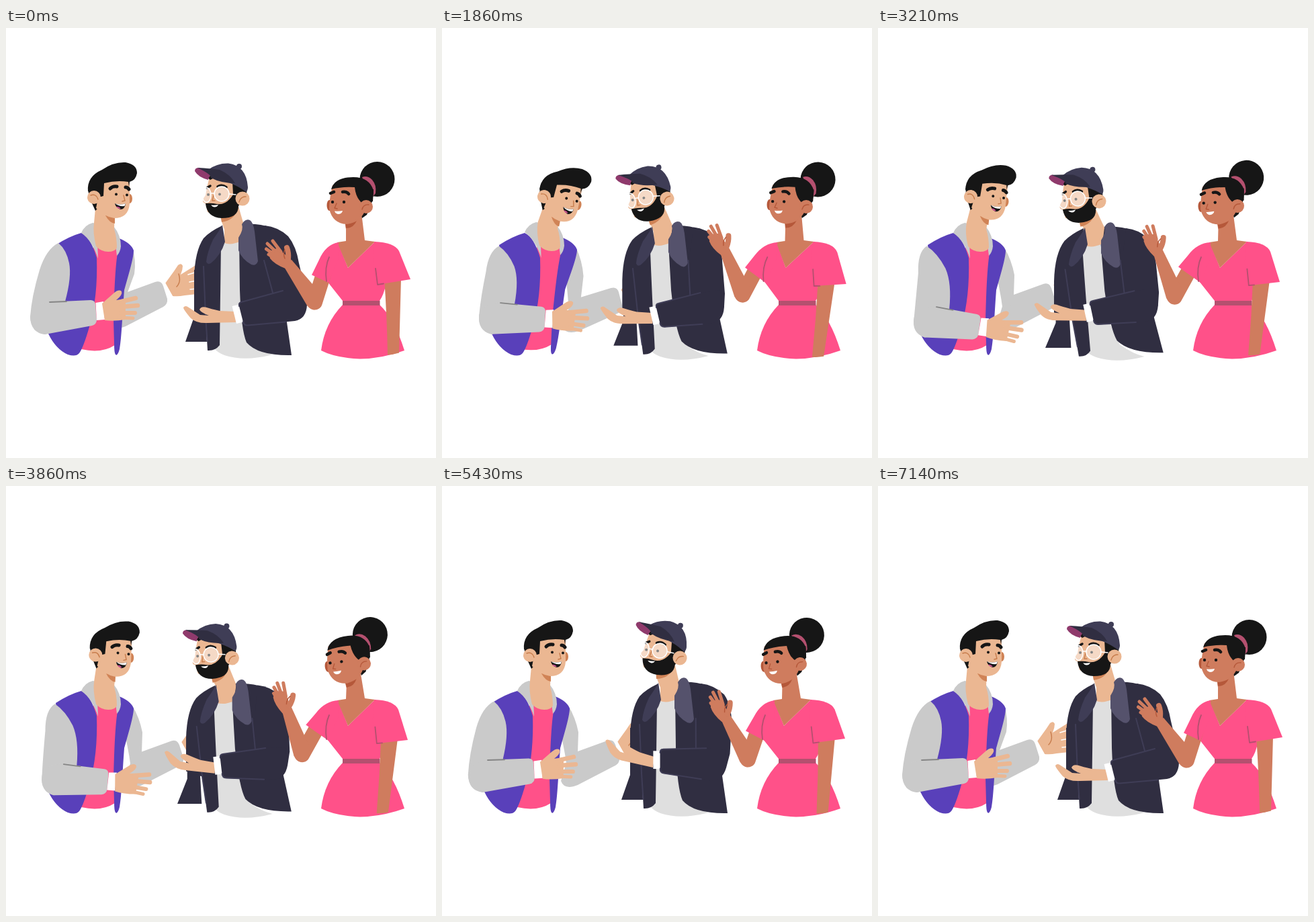
Animation, 640 px wide and 640 px high, one loop 7.21 s. Source, as an HTML page:

```html
<!DOCTYPE html>
<html lang="en">
<head>
<meta charset="utf-8">
<title>Three people talking</title>
<style>
html,body{margin:0;width:100%;height:100%;overflow:hidden;background:#fff}
svg{display:block;width:100%;height:100%}
.line{fill:none;stroke-linecap:round;stroke-linejoin:round}
.purple{fill:#5940ba}.pink{fill:#ff5189}.grey{fill:#cacaca}.pale{fill:#dfdfdf}
.skin{fill:#ebb792}.tan{fill:#cf7c5e}.navy{fill:#302e41}.slate{fill:#3f3d56}
.hair{fill:#161616}.white{fill:#fff}.rose{fill:#b4506f}.shade{fill:#d08356}.rust{fill:#b5583a}
.sSkin{stroke:#ebb792}.sTan{stroke:#cf7c5e}.sHair{stroke:#161616}
.sSlate{stroke:#3f3d56;stroke-width:2}.sShade{stroke:#c77c4c;stroke-width:1.4}
.sRust{stroke:#b5583a;stroke-width:1.4}.sRose{stroke:#b4506f;stroke-width:1.8}
</style>
</head>
<body>
<svg viewBox="0 0 640 640">
<!-- left man -->
<g id="leftFar">
  <path class="skin" d="M237 380L250 362L256 353Q261 349 263 354Q263 360 260 367L284 352L284 396L266 398Q255 400 248 399Z"/>
  <path class="line sShade" d="M254 385Q261 378 257 366"/>
  <path class="line" stroke="#fff" stroke-width="1.5" d="M271 367L284 363M273 378L284 376M274 389L284 388"/>
  <path class="white" d="M232 383L237 379L248 399L238 405Z"/>
  <path class="grey" d="M178 394L222 378Q231 375 234 384L240 403Q241 411 234 415L178 444Q158 452 153 438L165 398Z"/>
</g>
<path id="leftFarUpper" class="grey" d="M170 330L188 327Q194 345 191 366L180 396L165 440L160 400Z"/>
<path id="leftShirt" class="pink" d="M130 326L167 326Q164 380 162 472Q142 485 112 478Q128 440 130 326Z"/>
<path id="leftPanel" class="purple" d="M74 323Q94 310 112 305Q126 311 135 342Q137 400 124 445Q115 476 109 484Q104 490 92 486Q74 478 63 455L84 400Z"/>
<g id="leftTop">
  <path class="purple" d="M168 313Q186 320 190 331Q190 340 183 365L176 390C173 430 172 462 169 478Q166 489 163 486Q161 484 161 470L160 435C161 400 162 360 166 335Z"/>
  <path class="grey" d="M112 305Q117 293 129 290L135 291L137 343Q128 316 112 305Z"/>
  <path class="grey" d="M160 295Q171 308 171 325Q170 334 165 339L162 315Z"/>
</g>
<path id="leftNeck" class="skin" d="M134 258L131 290Q129 305 134 325Q142 333 152 333Q162 333 165 327Q165 312 161 299L162 270Z"/>
<g id="leftHead">
  <path class="shade" d="M148 279Q154 290 162 291L162 280Z"/>
  <ellipse class="shade" cx="184" cy="254" rx="4" ry="7"/>
  <path class="hair" d="M122 240L124 252L133 272L150 255L150 230Z"/>
  <path class="skin" d="M142 228L184 226L184 262Q182 283 161 283Q146 281 134 268Z"/>
  <path class="hair" d="M122 243Q120 221 143 211Q160 199 178 200Q195 203 195 216Q193 227 184 229L183 236L182 229Q165 226 146 231L145 250L138 252Z"/>
  <circle class="skin" cx="131" cy="252" r="10"/>
  <path class="line sShade" d="M126 249Q134 246 137 255"/>
  <path class="line sHair" stroke-width="5" d="M155 239Q159 235 165 236M178 237Q181 237 183 240"/>
  <circle class="hair" cx="164" cy="247.500" r="2"/><circle class="hair" cx="180" cy="248.500" r="2"/>
  <path class="line sShade" d="M175 249L177 257L173 258"/>
  <path class="hair" d="M162 261Q170 264 178 261Q177 270 170 270Q163 267 162 261Z"/>
  <path class="white" d="M162 261Q170 264 178 261L176.500 265Q168 266 162 261Z"/>
  <path fill="#c8508f" d="M164 266Q168 265 171 269Q167 270 164 266Z"/>
</g>
<path id="leftUpper" class="grey" d="M78 320Q60 329 50 360Q38 400 36 430Q37 452 58 456L100 440L88 407Q98 370 94 350Q90 330 78 320Z"/>
<g id="leftNear">
  <path class="grey" d="M36 430Q37 454 58 456L128 443Q135 441 135 434L133 411Q132 405 126 405L60 408Q38 415 36 430Z"/>
  <path class="line" stroke="#858585" stroke-width="1.800" d="M65 408L90 407"/>
  <path class="white" d="M133.500 409L145 407L147 434L135 435Z"/>
  <path class="skin" d="M143 410L160 395Q168 388 172 392Q174 397 164 405L178 403L178 434Q160 437 147 435Z"/>
  <g class="line sSkin"><path stroke-width="6.500" d="M172 407L193 402M172 415L196 413"/><path stroke-width="6" d="M172 424L192 424"/><path stroke-width="5" d="M168 431L189 432"/></g>
</g>
<!-- middle man -->
<path id="midShirt" class="pale" d="M318 312L350 312L352 440L362 468Q380 482 397 486Q355 497 325 487Q315 483 310 477L317 465Z"/>
<path id="midFlap" class="navy" d="M280 360L280 430L267 467L299 467L297 425L300 360Z"/>
<path id="midLeft" class="navy" d="M322 294Q303 303 294 313Q281 332 280 372L280 420L297 428L300 480Q311 481 318 472Q319 400 320 320Z"/>
<path id="midSeam" class="line sSlate" d="M294 355L297 428L299.500 466"/>
<path id="midRight" class="navy" d="M345 293Q372 289 395 297Q418 306 423 345L417 431L425 487Q375 488 358 468Q350 450 348 390L347 310Z"/>
<path id="midNeck" class="skin" d="M318 275L321 288L325 300L325 320Q335 324 350 317L354 293L345 262Z"/>
<g id="midTop">
  <path class="slate" d="M322 293Q318 301 308 315Q299 335 298 348Q300 353 305 350Q320 338 326 318Z"/>
  <path fill="#55526c" d="M354 288Q358 284 363 286Q368 289 370 303L375 347Q372 355 365 352Q351 344 346 331L346 312Q354 300 351 292Z"/>
</g>
<g id="midHead">
  <path class="shade" d="M320 283Q335 282 344 270Q340 286 321 289Z"/>
  <path class="skin" d="M304 218Q299 236 297 249Q289 259 297 261L300 274L322 280L345 262L348 230Z"/>
  <path class="hair" d="M337 228L359 238L358 246L346 265Q346 283 321 283Q299 282 297 261Q306 260 314 262Q328 264 338 248ZM300 223L306 218L312 222L304 226Z"/>
  <circle class="skin" cx="352" cy="254" r="10.500"/>
  <path class="line sShade" d="M347 259Q349 251 357 251"/>
  <path class="slate" d="M301 211Q314 201 331 201.500Q358 205 360 237Q360 242 357 244Q340 230 306 223Z"/>
  <circle class="slate" cx="347" cy="206" r="4"/>
  <path fill="#8f3a6c" d="M287 208Q281 208 281 213Q286 222 301 226Q302 220 308 217Z"/>
  <path class="navy" d="M285 208Q304 209 318 211Q334 218 341 231Q320 231 305 223Q306 218 285 208Z"/>
  <path class="line sHair" stroke-width="3.500" d="M315 236Q321 232 328 237M299 238L304 235"/>
  <circle class="hair" cx="301" cy="248" r="2"/><circle class="hair" cx="318" cy="247.500" r="2"/>
  <path class="line sShade" d="M309 249L307 257L311 257"/>
  <g stroke="#fff" stroke-width="1.500" fill="#fff" fill-opacity=".48"><circle cx="321" cy="247" r="11"/><ellipse cx="298.500" cy="248.500" rx="6.500" ry="11"/><path class="line" d="M305 246L310 246M332 247L342 248"/></g>
  <path class="white" d="M305 263.500Q311 264 316 263Q314 267 310 266.500Q307 266 305 263.500Z"/>
</g>
<path id="midUpper" class="navy" d="M385 294Q405 296 420 310Q432 325 436 350L446 392L448 412L400 420L385 349Z"/>
<path id="midFold" class="line sSlate" d="M384 349L397 394"/>
<g id="midFore">
  <path class="skin" d="M341 422L318 421Q305 418 297 415.500Q290 414 288 419Q289 423 302 428L289 427L272 416Q267 412 264 416Q264 419 275 432Q284 440 300 439L342 438Z"/>
  <path class="white" d="M336.500 414L349 411L356 437L343 440Z"/>
  <path class="navy" d="M347 414Q346 409 350 408L412 391L441 386L448 412Q447 433 430 436L360 443Q354 443 353 438Z"/>
  <path class="line sSlate" d="M347 414Q346 409 350 408L412 391M353 437Q354 443 360 442.500L416 437.500"/>
</g>
<!-- woman -->
<path class="pink" d="M501 412L556 412Q578 432 593 480Q560 492 527 492.500Q490 491 469 480Q474 440 501 412Z"/>
<path id="wBody" class="pink" d="M494 319L480 335L478 377L501 406L556 406Q562 398 566 380L570 330L549 318L509 357Z"/>
<path class="rose" d="M501 406H556.500V413H501Z"/>
<g id="wBun">
  <circle class="hair" cx="552.500" cy="225" r="26"/>
  <path class="rose" d="M530 222Q538 219 545 226Q552 234 550 246L543 255Z"/>
</g>
<path id="wNeck" class="tan" d="M504 284L506 300L506 317L493 319L509 357L549 318L534 316L529 275Z"/>
<g id="wHead">
  <path class="rust" d="M505 291Q516 290 522 287Q517 298 506 298Z"/>
  <ellipse class="rust" cx="481.500" cy="264" rx="4" ry="8"/>
  <path class="hair" d="M520 240L547 240Q547 254 543 264L537 278L530 283Z"/>
  <path class="tan" d="M486 234Q481 255 481 269Q486 291 507 292Q526 290 534 273L535 250L518 232Z"/>
  <path class="hair" d="M484 240Q489 222 517 222Q541 222 547 242L546 258L532 262Q521 255 519 237Q500 236 484 240Z"/>
  <circle class="tan" cx="536" cy="266" r="10"/>
  <path class="line sRust" d="M530 270Q532 262 540 263"/>
  <path class="line sHair" stroke-width="4.500" d="M483 246L488 244M501 244Q507 243 510 247"/>
  <circle class="hair" cx="486" cy="259" r="2.200"/><circle class="hair" cx="503" cy="259" r="2.200"/>
  <path class="line sRust" d="M492 261L489 268L493 269"/>
  <path class="white" d="M489 272.500Q495 273 501 272Q500 277 494 277Q490 276 489 272.500Z"/>
</g>
<path id="wUpper" class="line sTan" stroke-width="23"/>
<path id="wSleeveL" class="pink" d="M495 319Q476 322 466 345L455 367.500L480 379L494 345Z"/>
<path id="wCrease" class="line sRose" d="M481 341Q474 356 477 377"/>
<g id="wFore">
  <path class="tan" d="M448 413Q459 426 470 412L468 395L425 345L413 354Z"/>
  <g id="wHand">
    <path class="tan" d="M391 333L405 327L414 336L424 344L425 348L416 358Q400 352 393 343Z"/>
    <path class="line sTan" stroke-width="5" d="M409 333L397 317M405 336L389 321M402 339L387.500 329M402 344L391 337"/>
    <path class="line sTan" stroke-width="8" d="M418 327Q421 335 420 344"/>
    <path class="line sRust" d="M415 330Q412 336 415 343"/>
  </g>
</g>
<path id="wArm" class="tan" d="M563 372L588 372L585 483.500Q577 486 568 486.500Q567 430 563 372Z"/>
<path id="wSleeveR" class="pink" d="M548 318Q578 319 585 332L602 374L553 382L546 350Z"/>
<path id="wHem" class="line sRose" d="M550 358L553 382L562 380.500"/>
</svg>
<script>
const STEP = 7210 / 101;
const KEYS = [0, 12, 26, 45, 63, 76, 88, 100];
const REST = [0, 0, 0];

// One row per key: x, y, turn (or fewer values)
const TRACKS = {
  leftLean: [[0], [0], [1], [0], [0], [0], [0], [0]],
  leftHead: [REST, [9, -3, 14], [21, -1, 12], [7, -1, 6.5], REST, REST, REST, REST],
  leftNear: [REST, [1.5, 0, .5], [22, 1, 8], [22, 7, 13], [18, 4, 4.5], [3, 0, .5], REST, REST],
  leftFar: [REST, [24, 1, 0], [28, 10, 3], [24, 3, 0], [24, 1, 0], [24, 1, 0], [24, 1, 0], REST],
  midLean: [[0], [0], [.65], [1], [.22], [0], [0], [0]],
  midHead: [REST, REST, [-17, 0, -9], [-23, 4, -5.5], [-5, 0, -1], [2, 2, 7], [1, 0, 2], REST],
  midFore: [REST, [-20, -17, 14], [-28, 2, 1], [-31, -2, 2], [-23, -16, 13], [-21, -17, 14], [-20, -17, 14], REST],
  wLean: [[0], [6], [4.5], [0], [0], [0], [0], [0]],
  wHead: [REST, [10, 0, 2.5], [6, 0, 1], [-1, -1, -3], [-4, -2, -9.5], [-3, -1, -6], [-1, -.5, -2.5], REST],
  wFore: [REST, [0, -5, 5.5], [-12, -11, 12.7], [-18, -8, 14.5], [-19, -9, 17], [-4, -1, 6.6], [-1, 0, 2], REST],
  wHand: [[0], [6.5], [4], [8], [12], [13], [5], [0]],
  wSleeveL: [[0, 0], [4, -5], [-4, -11], [-8, -12], [-9, -12], [-3, -3], [-1, -1], [0, 0]],
  wSleeveR: [[0, 0], [0, 8], [-2, 7], [-4, 4], [-4, 4], [-2, 2], [-1, 1], [0, 0]],
  wArm: [REST, [0, 5, 6.4], [-4, 5, 6.9], [-5.5, 2, 6], [-5, 2, 5.5], [-3.5, 2, 3.7], [-1, 1, 1.5], REST]
};

const $ = id => document.getElementById(id);
const clamp = v => Math.max(0, Math.min(1, v));
const mix = (a, b, w) => a + (b - a) * w;

function slope(rows, i, c) {
  if (!i || i === KEYS.length - 1) return 0;
  const a = (rows[i][c] - rows[i - 1][c]) / (KEYS[i] - KEYS[i - 1]);
  const b = (rows[i + 1][c] - rows[i][c]) / (KEYS[i + 1] - KEYS[i]);
  return a * b > 0 ? 2 * a * b / (a + b) : 0;
}

// Monotone cubic through the keys
function sample(rows, f) {
  let i = 0;
  while (i < KEYS.length - 2 && f >= KEYS[i + 1]) i++;
  const h = KEYS[i + 1] - KEYS[i], u = (f - KEYS[i]) / h, v = 1 - u;
  return rows[i].map((p, c) =>
    p * v * v * (1 + 2 * u) + rows[i + 1][c] * u * u * (3 - 2 * u) +
    h * u * v * (slope(rows, i, c) * v - slope(rows, i + 1, c) * u));
}

const rigid = ([dx, dy, r], cx, cy) => {
  const a = r * Math.PI / 180, c = Math.cos(a), s = Math.sin(a);
  return (x, y) => [cx + dx + (x - cx) * c - (y - cy) * s, cy + dy + (x - cx) * s + (y - cy) * c];
};
const blend = (f, g, weight) => (x, y) => {
  const a = f(x, y), b = g(x, y), w = clamp(weight(x, y));
  return [mix(a[0], b[0], w), mix(a[1], b[1], w)];
};

const shapes = {};
function bend(id, fn) {
  const d = shapes[id] ??= $(id).getAttribute('d');
  $(id).setAttribute('d', d.replace(/([\d.]+) ([\d.]+)/g,
    (_, x, y) => fn(+x, +y).map(n => n.toFixed(2)).join(' ')));
}
const place = (id, [dx, dy, r], cx, cy) =>
  $(id).setAttribute('transform', `translate(${dx} ${dy}) rotate(${r} ${cx} ${cy})`);

function drawLeft(p) {
  const lean = p.leftLean[0] * 11;
  const body = (x, y) => [x + lean * clamp((488 - y) / 150), y - lean * .1];
  const shoulder = (x, y) => [x + lean * 1.1 - p.leftNear[0] * .25, y + p.leftNear[0] * .2];
  place('leftHead', p.leftHead, 131, 252);
  place('leftNear', p.leftNear, 64, 408);
  place('leftFar', p.leftFar, 240, 405);
  bend('leftPanel', (x, y) => [x + lean, y]);
  bend('leftShirt', body);
  for (const el of $('leftTop').children) {
    el.id ||= 'leftTop' + el.getAttribute('d').length;
    bend(el.id, body);
  }
  bend('leftNeck', blend(body, rigid(p.leftHead, 131, 252), (x, y) => (302 - y) / 35));
  bend('leftUpper', blend(shoulder, rigid(p.leftNear, 64, 408), (x, y) => (y - 320) / 100));
  bend('leftFarUpper', blend(body, rigid(p.leftFar, 240, 405), (x, y) => (y - 330) / 72));
}

function drawMid(p) {
  const m = p.midLean[0], high = y => clamp((490 - y) / 150);
  const body = (x, y) => [x - 16 * m * high(y), y + m * (8 * high(y) - 4)];
  const front = (x, y) =>
    [x - m * mix(16 * high(y), 18, clamp((298 - x) / 14)), y + m * (9 - 5 * high(y))];
  const fore = rigid(p.midFore, 347, 408);
  place('midHead', p.midHead, 352, 254);
  place('midFore', p.midFore, 347, 408);
  place('midTop', [-14 * m, 4 * m, 0], 335, 320);
  bend('midShirt', (x, y) => [x - 16 * m * high(y), y + 3 * m]);
  bend('midRight', body);
  bend('midLeft', front);
  bend('midSeam', front);
  bend('midFlap', (x, y) => [x - m * (18 - (x - 267) * .2), y + 9 * m]);
  bend('midNeck', blend(body, rigid(p.midHead, 352, 254), (x, y) => (300 - y) / 25));
  bend('midUpper', blend(body, fore, (x, y) => (y - 292) / 115));
  bend('midFold', blend((x, y) => [x - 6 - 14 * m - (p.midFore[0] + 20) * -.3, y - 3], fore, (x, y) => (y - 349) / 45));
}

function drawWoman(p) {
  const lean = p.wLean[0];
  const body = (x, y) => [x + lean * clamp((406 - y) / 88), y];
  const [lx, ly] = p.wSleeveL, [rx, ry] = p.wSleeveR;
  const left = (x, y) => {
    const w = clamp((480 - x) / 25);
    return [body(x, y)[0] * (1 - w) + x * w + lx * w, y + ly * w];
  };
  const right = (x, y) => {
    const w = clamp((y - 318) / 56) * clamp((x - 540) / 45);
    return [body(x, y)[0] + rx * w, y + ry * w];
  };
  place('wHead', p.wHead, 536, 266);
  place('wBun', [p.wHead[0], p.wHead[1], p.wHead[2] * 1.5], 536, 266);
  place('wFore', p.wFore, 459, 408);
  place('wHand', [0, 0, p.wHand[0]], 420, 350);
  place('wArm', p.wArm, 576, 377);
  bend('wBody', body);
  bend('wNeck', blend(body, rigid(p.wHead, 536, 266), (x, y) => (315 - y) / 30));
  bend('wSleeveL', left);
  bend('wCrease', body);
  bend('wSleeveR', right);
  bend('wHem', right);
  const elbow = rigid(p.wFore, 459, 408)(459.5, 408);
  $('wUpper').setAttribute('d', `M${474 + lx * .8} ${362 + ly * .8}L${elbow.join(' ')}`);
}

function draw(ms) {
  const f = Math.min(100, Math.floor((ms % 7210 + 5) / STEP));
  const pose = {};
  for (const name in TRACKS) pose[name] = sample(TRACKS[name], f);
  drawLeft(pose);
  drawMid(pose);
  drawWoman(pose);
}

const start = performance.now();
function tick() {
  draw(performance.now() - start);
  requestAnimationFrame(tick);
}
tick();
</script>
</body>
</html>
```
